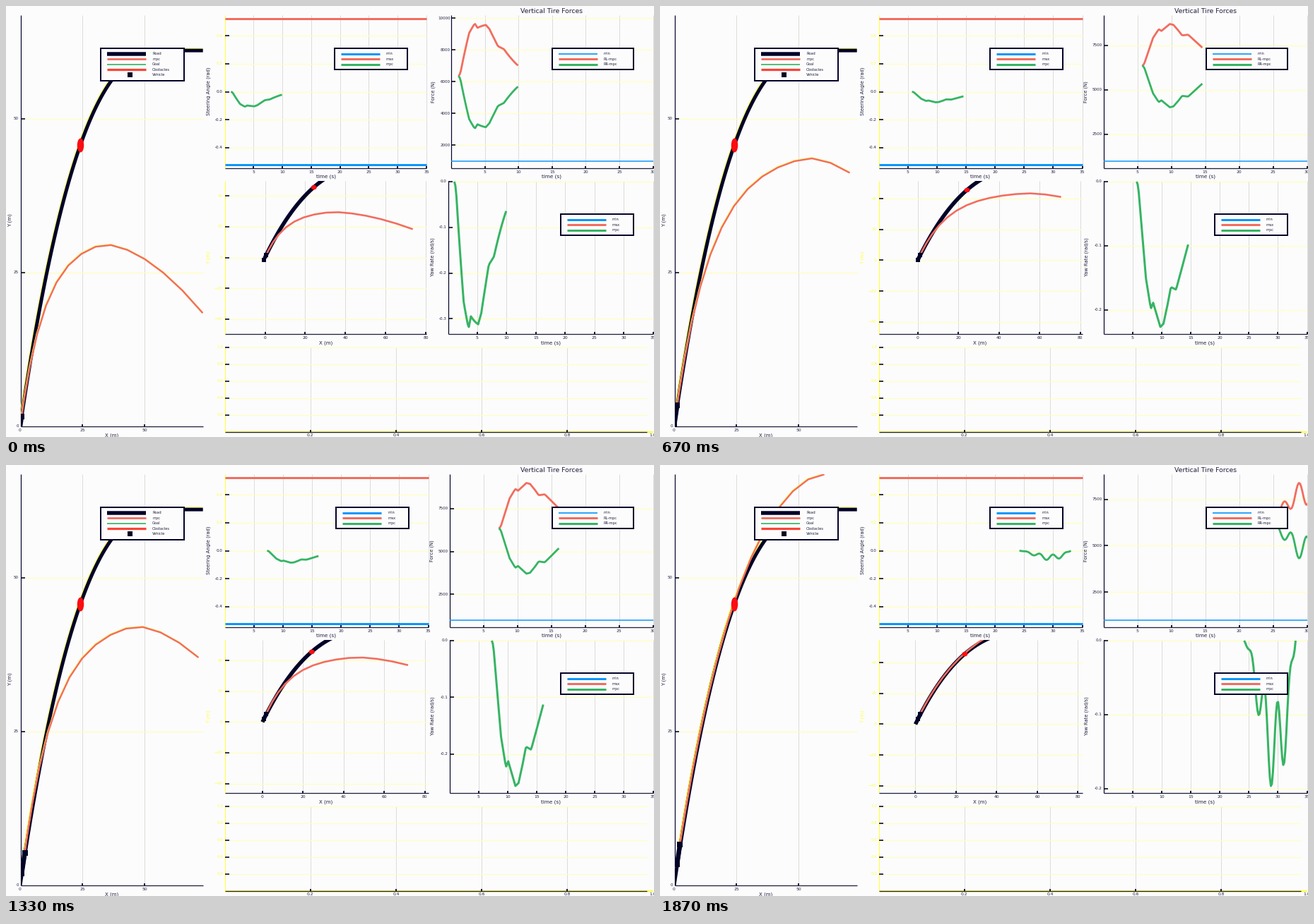
Recreate the animation shown at these times as a matplotlib script. Size 917x611 px, loop 1940 ms.

```python
import numpy as np
import matplotlib.pyplot as plt
from matplotlib.animation import FuncAnimation
from matplotlib.patches import Ellipse, Rectangle

W, H, DPI = 917, 611, 64
PT = 72 / DPI
LOOP, TICK, STEPS = 1940, 20, 29

BG, INK, ROAD = "#fcfcfd", "#20203c", "#020228"
BLUE, CORAL, GREEN, RED = "#0c96fa", "#f26d5e", "#36b463", "#fb0d12"
YELLOW, GRID, GRAY = "#ffff4a", "#ffffbe", "#dcdcd8"

# step, plan start (s), peak steering (rad), path apex x, apex y, path end x (m)
KEYS = np.array([
    (0, 1.08, .106, 34.5, 29.5, 73.4),
    (4, 3.65, .073, 61.8, 43.9, 70.0),
    (10, 5.72, .0755, 55.0, 43.5, 70.6),
    (16, 6.42, .0655, 68.0, 50.7, 68.6),
    (20, 7.28, .0855, 47.3, 42.0, 71.7),
    (24, 19.55, .0855, 47.6, 43.0, 71.7),
    (28, 24.2, .0655, 60.4, 66.7, 60.4),
])
SPAN = 8.85
U = np.linspace(0, 1, 51)
# One turning manoeuvre, shared by steering, tire load and yaw.
TURN = np.interp(U, [0, .03, .18, .275, .32, .46, .52, .6, .665, .765, .88, 1],
                 [0, .03, .66, .87, .83, 1, .98, .85, .73, .75, .6, .44])
WEAVE = np.sin(np.pi * U ** 1.4) * (.7 + .3 * np.cos(2 * np.pi * U / .26))

ROAD_X = np.linspace(0, 73.5, 120)
ROAD_Y = 61 * (1 - np.clip(1 - ROAD_X / 60, 0, 1) ** 2.67)
MAP = (20, 12, 278.5, 595.5)
LIMITS = [("min", BLUE, 3), ("max", CORAL, 3), ("mpc", GREEN, 3)]

fig = plt.figure(figsize=(W / DPI, H / DPI), dpi=DPI, facecolor=BG)
ax = fig.add_axes([0, 0, 1, 1])
ax.set(xlim=(-.5, W - .5), ylim=(H - .5, -.5))  # whole numbers are pixel centres
ax.axis("off")
live = []


class Plan:
    """State of the car and its predicted manoeuvre at one step."""

    def __init__(self, step):
        row = [np.interp(step, KEYS[:, 0], col) for col in KEYS.T[1:]]
        self.start, self.turn, self.apex_x, self.apex_y, self.end_x = row
        self.step = step
        self.x, self.y = .0625 * step, .18 * step
        self.weave = np.clip((step - 24) / 4, 0, 1)
        shape = TURN * (1 + .85 * np.exp(-step / 3) * (.3 - U))
        shape = shape * (1 - self.weave) + WEAVE * self.weave
        self.steer = self.turn * shape / shape.max()
        self.time = self.start + SPAN * U

    def path(self):
        x0, y0 = self.x + .6, self.y + 1.6
        x = x0 + (self.end_x - x0) * np.linspace(0, 1, 15) ** 1.6
        s = np.clip((x - x0) / (self.apex_x - x0), 0, 1)
        bend = 3.05 + .013 * self.apex_x - 1.35 * self.weave
        rise = 1 - (1 - s) ** (bend + (1.9 - bend) * s)
        fall = .022 * np.clip(x - self.apex_x, 0, None) ** 1.7
        return x, y0 + (self.apex_y - y0) * rise - fall


def keep(artist, box=None):
    if box:
        x0, y0, x1, y1 = box
        artist.set_clip_path(Rectangle((x0, y0), x1 - x0, y1 - y0, transform=ax.transData))
    live.append(artist)


def line(x, y, color, lw, box=None, z=3):
    keep(ax.plot(x, y, color=color, lw=lw * PT, zorder=z,
                 solid_capstyle="butt", solid_joinstyle="round")[0], box)


def rimmed(x, y, color, lw, rim):
    line(x - .7 * rim, y - rim, YELLOW, lw, MAP)
    line(x, y, color, lw, MAP)


def text(x, y, s, size=7, color=INK, rot=0, ha="center", z=4):
    keep(ax.text(x, y, s, size=size * PT, color=color, rotation=rot, ha=ha,
                 va="center", zorder=z, family="DejaVu Sans"))


def vlines(xs, y0, y1, color, lw=1, z=1):
    keep(ax.vlines(xs, y0, y1, color=color, lw=lw * PT, zorder=z))


def hlines(ys, x0, x1, color, lw=1, z=1):
    keep(ax.hlines(ys, x0, x1, color=color, lw=lw * PT, zorder=z))


def frame(box, xs, ys, left=ROAD, bottom=INK):
    x0, y0, x1, y1 = box
    vlines(xs, y0, y1, GRAY)
    hlines(ys, x0, x1, GRID, 1.2)
    vlines(x0, y0, y1, left, 1.2, 2)
    hlines(y1, x0, x1, bottom, 1.3, 2)
    vlines(xs, y1 - 3, y1, ROAD, 1.8, 2)
    hlines(ys, x0, x0 + 6, ROAD, 1.6, 2)


def x_labels(xs, y, names):
    for x, s in zip(xs, names):
        text(x, y, s, 6)


def y_labels(x, ys, names, color=INK):
    for y, s in zip(ys, names):
        text(x, y, s, 5.6, color, ha="right")


def legend(x, y, w, rows):
    h = 7.6 * len(rows) + 8
    keep(ax.add_patch(Rectangle((x, y), w, h, fc=BG, ec=ROAD, lw=2 * PT, zorder=6)))
    for k, (name, color, lw) in enumerate(rows):
        yy = y + 8 + 7.6 * k
        if lw:
            line([x + 9, x + 64], [yy, yy], color, lw, z=7)
        else:
            keep(ax.add_patch(Rectangle((x + 38, yy - 3.5), 7, 7, fc=color, lw=0, zorder=7)))
        text(x + 73.5, yy, name, 5.1, ha="left", z=7)


def to_map(x, y):
    return 19.5 + 3.52 * x, 595.5 - 8.736 * y


def obstacle(x, y, w, h, box=None):
    keep(ax.add_patch(Ellipse((x, y), w, h, fc=RED, lw=0, zorder=5)), box)


def car(plan, to_px, lw, box):
    ends = to_px(plan.x + np.array([-.6, .6]), plan.y + np.array([-1.65, 1.65]))
    line(*ends, ROAD, lw, box, 5)
    keep(ax.plot(*ends, "s", ms=lw * PT * 1.1, mew=0, color=ROAD, zorder=5)[0], box)


def build_static():
    frame(MAP, [107.5, 195.5], [377, 159])
    x_labels([19, 107.5, 195.5], 601, ["0", "25", "50"])
    y_labels(17.5, [595, 377, 159], ["0", "25", "50"])
    text(149, 608, "X (m)")
    text(5, 303, "Y (m)", rot=90)
    rimmed(*to_map(ROAD_X, ROAD_Y), ROAD, 5, 1)
    obstacle(105, 197, 9.5, 20)
    legend(133, 59, 118, [("Road", ROAD, 5.5), ("mpc", CORAL, 2.8), ("Goal", GREEN, 1.7),
                          ("Obstacles", "#fb4434", 3.2), ("Vehicle", ROAD, 0)])

    fifths = np.arange(1, 6) / 5
    cols, rows = 309 + 606 * fifths, 603 - 120 * fifths
    hlines(603, 309, 915, YELLOW, 2.4, 1.5)
    frame((309, 483, 906, 603), cols[:4], rows, YELLOW)
    x_labels(cols, 608, [f"{f:.1f}" for f in fifths])
    y_labels(307, rows, [f"{f:.1f}" for f in fifths], YELLOW)

    text(772, 6.5, "Vertical Tire Forces", 9.3)
    for x, y in [(452.5, 241), (772, 241), (770.5, 477)]:
        text(x, y, "time (s)", 7.2)
    text(452.5, 477, "X (m)")
    text(286, 120, "Steering Angle (rad)", 6.8, rot=90)
    text(286, 356, "Y (m)", 7, YELLOW, 90)
    text(603, 355, "Yaw Rate (rad/s)", 6.8, rot=90)
    legend(772, 59, 115, [("min", BLUE, 1.7), ("RL-mpc", CORAL, 3), ("RR-mpc", GREEN, 3)])
    legend(784, 294, 103, LIMITS)


def time_axis(box, end, rows):
    x0, _, x1, y1 = box
    marks = np.arange(5, end + 1, 5)
    scale = (x1 - x0) / end
    frame(box, x0 + scale * marks, rows, YELLOW if x0 == 309 else ROAD)
    x_labels(x0 + scale * marks, y1 + 5.5, [str(m) for m in marks])
    return lambda t: x0 + scale * t


def steering(plan, right):
    box = (309, 12, right, 229.5)
    angles = np.array([.4, .2, 0, -.2, -.4])
    rows = 121 - 198.5 * angles
    to_x = time_axis(box, 35, rows)
    names = [f"{a:.1f}" for a in angles]
    y_labels(306, rows[:2], names[:2], YELLOW)
    y_labels(306, rows[2:], names[2:])
    line([309, right], [17, 17], CORAL, 3)
    line([309, right], [224.5, 224.5], BLUE, 3)
    line(to_x(plan.time), 121 + 198.5 * plan.steer, GREEN, 2.8, box)
    legend(right - 130.5, 59, 103, LIMITS)


def forces(plan, left):
    box = (left, 12, 915, 229.5)
    shift = 31000 * plan.steer
    peak = 6350 + 31000 * plan.turn

    def to_y(load):
        return 219 - 194 * (load - 1000) / (peak - 1000)

    unit = 2500 if plan.step else 2000
    loads = np.arange(unit, peak + 500, unit)
    to_x = time_axis(box, 30, to_y(loads))
    y_labels(left - 1.5, to_y(loads), [str(n) for n in loads.astype(int)])
    text(left - 25, 121, "Force (N)", 6.8, rot=90)
    line([left, 915], [219, 219], BLUE, 1.5)
    line(to_x(plan.time), to_y(6350 + shift), CORAL, 2.8, box)
    line(to_x(plan.time), to_y(6350 - shift), GREEN, 2.8, box)


def local_map(plan, right):
    box = (309, 247.5, right, 464.5)
    scale = (right - 309) / 100.2

    def to_px(x, y):
        return 366 + scale * (x - plan.x), 356 - 2.18 * (y - plan.y)

    xs, ys = to_px(np.arange(0, 81, 20), np.arange(40, -41, -20))
    xs = xs[xs <= right + .5]
    frame(box, xs, ys, YELLOW)
    x_labels(xs, 470, ["0", "20", "40", "60", "80"])
    y_labels(306, ys, ["40", "20", "0", "−20", "−40"], YELLOW)
    line(*to_px(ROAD_X, ROAD_Y), ROAD, 5.5, box)
    line(*to_px(*plan.path()), CORAL, 2.6, box, 4)
    obstacle(*to_px(24.3, 45.6), 8, 6.5, box)
    car(plan, to_px, 5, box)


def yaw_rate(plan, left):
    box = (left, 247.5, 915, 464.5)
    scale = 206 / (3 * plan.turn)
    rates = np.arange(4) / 10
    rows = 248.5 + scale * rates
    rows = rows[rows < 464]
    to_x = time_axis(box, 35, rows)
    y_labels(left - 2, rows, [f"{-r:.1f}" if r else "0.0" for r in rates])
    line(to_x(plan.time), 248.5 + scale * 3 * plan.steer, GREEN, 3, box)


def draw(step):
    while live:
        live.pop().remove()
    plan = Plan(step)
    # Five-digit load labels push the plots apart on the first step.
    right, force_left, yaw_left = (597, 627, 627) if step else (594.5, 629.5, 625)
    rimmed(*to_map(*plan.path()), CORAL, 2.4, .6)
    car(plan, to_map, 6.5, MAP)
    steering(plan, right)
    forces(plan, force_left)
    local_map(plan, right)
    yaw_rate(plan, yaw_left)


# Steps run at 15 per second, rounded to 10 ms.
starts = [10 * round(20 * k / 3) for k in range(STEPS)]
shown = [None]


def update(n):
    step = int(np.searchsorted(starts, n * TICK + TICK / 2, side="right")) - 1
    if step != shown[0]:
        draw(step)
        shown[0] = step
    return []


build_static()
live.clear()
anim = FuncAnimation(fig, update, frames=LOOP // TICK, interval=TICK,
                     repeat=True, repeat_delay=0, blit=False)
plt.show()
```
